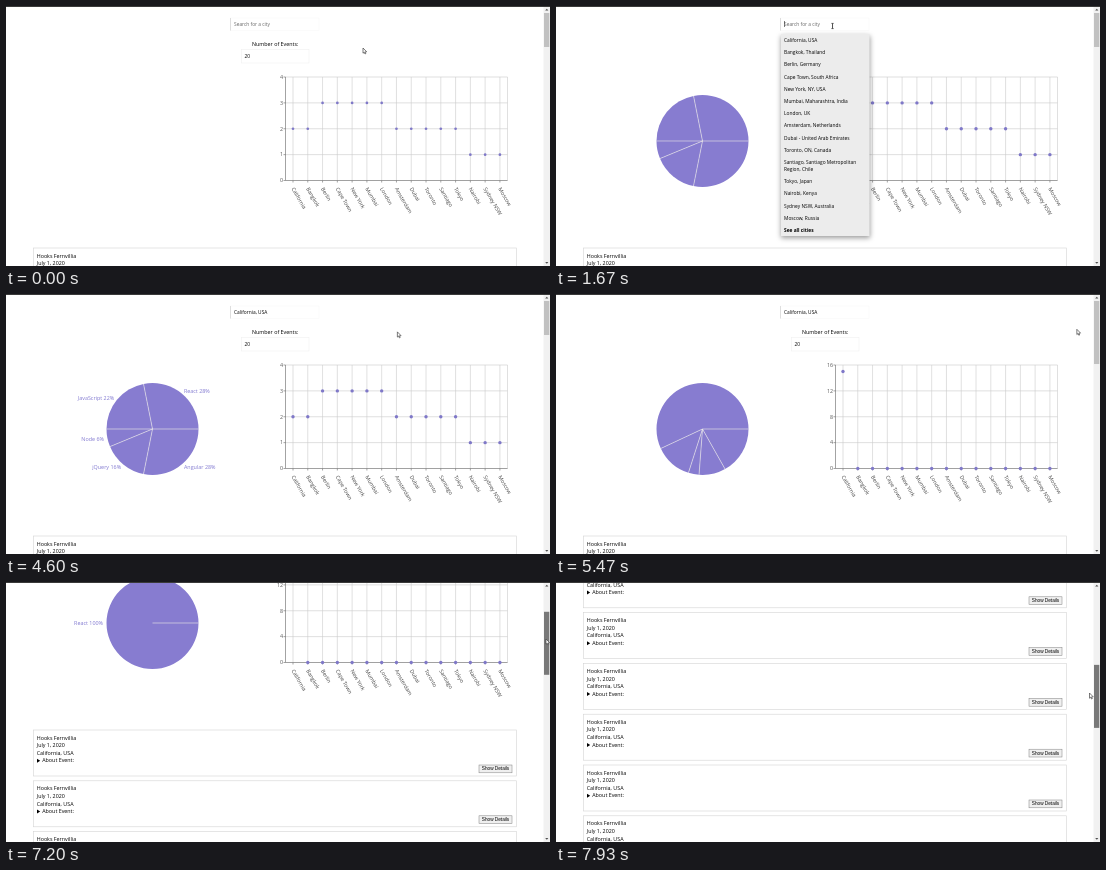
An HTML page with a canvas for the animation above (8 s loop, 544 px wide and 260 px high).

```html
<!DOCTYPE html>
<html lang="en">
<head>
<meta charset="utf-8">
<title>Event finder</title>
<style>
  html, body { margin: 0; width: 100%; height: 100%; overflow: hidden; background: #fff; }
  canvas { display: block; width: 544px; height: 260px; }
</style>
</head>
<body>
<canvas id="stage"></canvas>
<script>
const W = 544, H = 260, LOOP = 8000;
const canvas = document.getElementById('stage');
const ratio = window.devicePixelRatio || 1;
canvas.width = W * ratio;
canvas.height = H * ratio;
const ctx = canvas.getContext('2d');

const PURPLE = '#877cd0', INK = '#000';
const SANS = '"Open Sans", "Noto Sans", sans-serif', ARIAL = '"Liberation Sans", sans-serif';

// Moments of the story, in ms
const PIE_IN = 200, OPEN = 1300, PICK = 2200, FILTER = 4700, HOVER = 6000, PRESS = 6800;
const PIE_DELAY = 400, PIE_TIME = 1500, DOT_TIME = 400;

const cities = [
  ['California', 'California, USA', 2], ['Bangkok', 'Bangkok, Thailand', 2],
  ['Berlin', 'Berlin, Germany', 3], ['Cape Town', 'Cape Town, South Africa', 3],
  ['New York', 'New York, NY, USA', 3], ['Mumbai', 'Mumbai, Maharashtra, India', 3],
  ['London', 'London, UK', 3], ['Amsterdam', 'Amsterdam, Netherlands', 2],
  ['Dubai', 'Dubai - United Arab Emirates', 2], ['Toronto', 'Toronto, ON, Canada', 2],
  ['Santiago', 'Santiago, Santiago Metropolitan|Region, Chile', 2], ['Tokyo', 'Tokyo, Japan', 2],
  ['Nairobi', 'Nairobi, Kenya', 1], ['Sydney NSW', 'Sydney NSW, Australia', 1],
  ['Moscow', 'Moscow, Russia', 1]
].map(([name, place, events]) => ({ name, place, events }));
const genres = [['React', 9], ['JavaScript', 7], ['Node', 2], ['jQuery', 5], ['Angular', 9]];
const EVENT_COUNT = 32;

const cursorKeys = [
  [0, 357, 42], [300, 352, 40], [1000, 277, 20], [1700, 276.5, 20], [2050, 242, 32], [2250, 242, 32],
  [2620, 434, 31], [3150, 371, 32], [3500, 371, 33], [3700, 373, 38], [4500, 373, 38],
  [5300, 520, 37], [5500, 521, 35], [5950, 539, 32], [6950, 540, 31], [7200, 540, 57],
  [7930, 533.5, 111], [8000, 533, 114]
];
const scrollKeys = [[0, 0], [6950, 0], [7200, 94], [7930, 313], [8000, 325]];

const clamp = v => Math.max(0, Math.min(1, v));
const mix = (a, b, p) => a + (b - a) * p;

function track(keys, t) {
  const i = Math.max(1, keys.findIndex(k => k[0] >= t));
  const a = keys[i - 1], b = keys[i];
  const p = clamp((t - a[0]) / (b[0] - a[0]));
  return a.slice(1).map((v, n) => mix(v, b[n + 1], p));
}

// cubic-bezier(.25, .1, .25, 1)
function ease(x) {
  if (x <= 0 || x >= 1) return clamp(x);
  const curve = (a, b, s) => 3 * a * s * (1 - s) ** 2 + 3 * b * s * s * (1 - s) + s ** 3;
  let low = 0, high = 1;
  for (let i = 0; i < 20; i++) {
    const mid = (low + high) / 2;
    if (curve(.25, .25, mid) < x) low = mid; else high = mid;
  }
  return curve(.1, 1, low);
}

// Laid out at ten times the size so that small glyphs keep exact spacing
function text(str, x, y, { size = 5.35, color = INK, align = 'left', angle = 0, font = SANS, weight = 400 } = {}) {
  ctx.save();
  ctx.translate(x, y);
  ctx.rotate(angle);
  ctx.scale(.1, .1);
  ctx.font = `${weight} ${size * 10}px ${font}`;
  ctx.fillStyle = color;
  ctx.textAlign = align;
  ctx.textBaseline = 'middle';
  ctx.fillText(str, 0, 0);
  ctx.restore();
}

function rect(x, y, w, h, color) {
  ctx.fillStyle = color;
  ctx.fillRect(x, y, w, h);
}

function frame(x, y, w, h, color, width = .6) {
  ctx.strokeStyle = color;
  ctx.lineWidth = width;
  ctx.strokeRect(x, y, w, h);
}

function line(x1, y1, x2, y2, color, width = .6) {
  ctx.strokeStyle = color;
  ctx.lineWidth = width;
  ctx.beginPath();
  ctx.moveTo(x1, y1);
  ctx.lineTo(x2, y2);
  ctx.stroke();
}

function shape(points, fill, stroke) {
  ctx.beginPath();
  points.forEach(([x, y]) => ctx.lineTo(x, y));
  ctx.closePath();
  ctx.fillStyle = fill;
  ctx.fill();
  if (stroke) {
    ctx.strokeStyle = stroke;
    ctx.lineWidth = .7;
    ctx.stroke();
  }
}

function drawForm(t) {
  frame(224.5, 12, 88.5, 12.5, '#f8f8f8');
  line(224.5, 12, 224.5, 24.5, '#ccc');
  const picked = t >= PICK;
  text(picked ? 'California, USA' : 'Search for a city', 228, 18.5, { size: 4.85, color: picked ? INK : '#666' });
  if (t >= OPEN && !picked) line(228.5, 15, 228.5, 21, '#222');
  text('Number of Events:', 246, 38.9);
  frame(235.5, 43.5, 67.5, 13.5, '#f0f0f0');
  text('20', 238.5, 50.3, { size: 4.85 });
}

function drawPie(t) {
  const cx = 146.5, cy = 135, radius = 46, labelRadius = 49.5;
  const filtered = t >= FILTER;
  const start = filtered ? FILTER + PIE_DELAY : PIE_IN;
  const p = ease((t - start) / PIE_TIME);
  const point = (angle, r) => [cx + r * Math.cos(angle), cy - r * Math.sin(angle)];
  let angle = 0;
  const sectors = genres.map(([name, count], i) => {
    const share = count / EVENT_COUNT;
    const part = filtered ? mix(share, i ? 0 : 1, p) : share * p;
    const from = angle;
    angle += part * Math.PI * 2;
    return { name, part, from, to: angle };
  }).filter(s => s.part > 0);

  for (const { name, part, from, to } of sectors) {
    ctx.beginPath();
    ctx.moveTo(cx, cy);
    ctx.arc(cx, cy, radius, -from, -to, true);
    ctx.closePath();
    ctx.fillStyle = PURPLE;
    ctx.fill();
    if (p < 1) continue;
    const [x, y] = point((from + to) / 2, labelRadius);
    text(`${name} ${Math.round(part * 100)}%`, x, y + .6, { size: 5.4, color: '#8078d0', align: x > cx ? 'left' : 'right' });
  }
  for (const { from } of sectors) line(cx, cy, ...point(from, radius), '#f4f3ea', .55);
}

function drawScatter(t) {
  const left = 279.5, right = 501.5, top = 71, bottom = 174.5;
  const filtered = t >= FILTER;
  const xAt = i => 287 + i * 14.78;
  const yAt = (v, max) => bottom - (bottom - top) * v / max;
  const step = filtered ? 4 : 1;

  for (let i = 0; i <= 4; i++) {
    const y = yAt(i, 4);
    line(left, y, right, y, '#ccc');
    line(left - 2, y, left, y, '#666');
    text(i * step, 277, y + .4, { color: '#555', align: 'right' });
  }
  line(right, top, right, bottom, '#ccc');
  cities.forEach(({ name }, i) => {
    line(xAt(i), top, xAt(i), bottom, '#ccc');
    line(xAt(i), bottom, xAt(i), bottom + 2, '#666');
    text(name, xAt(i) - .6, 182, { color: '#444', angle: Math.PI / 3 });
  });
  line(left, top, left, bottom, '#666');
  line(left, bottom, right, bottom, '#777');

  const p = ease((t - FILTER) / DOT_TIME);
  const dotRadius = mix(1.35, 1.7, ease(t / 200));
  ctx.fillStyle = '#7f78c8';
  cities.forEach(({ events }, i) => {
    ctx.beginPath();
    ctx.arc(xAt(i), mix(yAt(events, 4), yAt(i ? 0 : 15, 16), p), dotRadius, 0, 7);
    ctx.fill();
  });
}

function drawCards() {
  for (let i = 0; i < 15; i++) {
    const y = 242 + i * 50.8;
    frame(27.5, y, 483, 46, '#d4d4d4');
    text('Hooks Fernvillia', 30.7, y + 8.3);
    text('July 1, 2020', 30.7, y + 15.9);
    text('California, USA', 30.7, y + 23.5);
    shape([[31, y + 28.7], [31, y + 32.7], [34.2, y + 30.7]], INK);
    text('About Event:', 36.2, y + 31.1);
    rect(473, y + 35, 33, 7.8, '#efefef');
    frame(473, y + 35, 33, 7.8, '#808080', .5);
    text('Show Details', 489.5, y + 39.2, { size: 4.7, font: ARIAL, align: 'center' });
  }
}

function drawSuggestions() {
  ctx.save();
  ctx.shadowColor = 'rgba(0,0,0,.4)';
  ctx.shadowBlur = 5 * ratio;
  ctx.shadowOffsetY = 2 * ratio;
  rect(225, 28, 88.5, 202, '#ececec');
  ctx.restore();
  let y = 34.6;
  for (const { place } of cities) {
    const lines = place.split('|');
    lines.forEach((str, i) => text(str, 228, y + i * 6.7, { size: 4.85 }));
    y += 12.23 + (lines.length - 1) * 6.7;
  }
  text('See all cities', 228, y, { size: 4.85, weight: 700 });
}

function drawScrollbar(t, scroll) {
  const pageHeight = t < FILTER ? 1881 : 1015, trackTop = 7, trackHeight = 246;
  const color = t >= PRESS ? '#787878' : t >= HOVER ? '#a8a8a8' : '#c1c1c1';
  rect(537.5, 0, 6.5, H, '#f1f1f1');
  rect(538, trackTop + scroll / pageHeight * trackHeight, 5.3, H / pageHeight * trackHeight, color);
  shape([[539.2, 4.6], [542.4, 4.6], [540.8, 2.8]], '#505050');
  shape([[539.2, 256], [542.4, 256], [540.8, 257.8]], '#505050');
}

function drawCursor(t) {
  const [x, y] = track(cursorKeys, t);
  if (x > 225 && x < 313 && y > 12 && y < 24) {
    line(x, y - 2.6, x, y + 2.6, '#222', .8);
    for (const end of [-2.6, 2.6]) line(x - 1.2, y + end, x + 1.2, y + end, '#222');
    return;
  }
  const arrow = [[0, 0], [0, 5.2], [1.2, 4.2], [2, 6], [2.8, 5.6], [2, 3.9], [3.7, 3.8]];
  shape(arrow.map(([dx, dy]) => [x + dx, y + dy]), '#fff', '#444');
}

function draw(now) {
  const t = now % LOOP;
  const [scroll] = track(scrollKeys, t);
  ctx.setTransform(ratio, 0, 0, ratio, 0, 0);
  rect(0, 0, W, H, '#fff');
  ctx.save();
  ctx.translate(0, -scroll);
  drawForm(t);
  drawPie(t);
  drawScatter(t);
  drawCards();
  if (t >= OPEN && t < PICK) drawSuggestions();
  ctx.restore();
  drawScrollbar(t, scroll);
  rect(0, 0, W, 1, '#3a3a3a');
  drawCursor(t);
}

let origin;
function tick(now) {
  origin ??= now;
  draw(Math.max(0, now - origin));
  requestAnimationFrame(tick);
}
requestAnimationFrame(tick);
</script>
</body>
</html>
```
